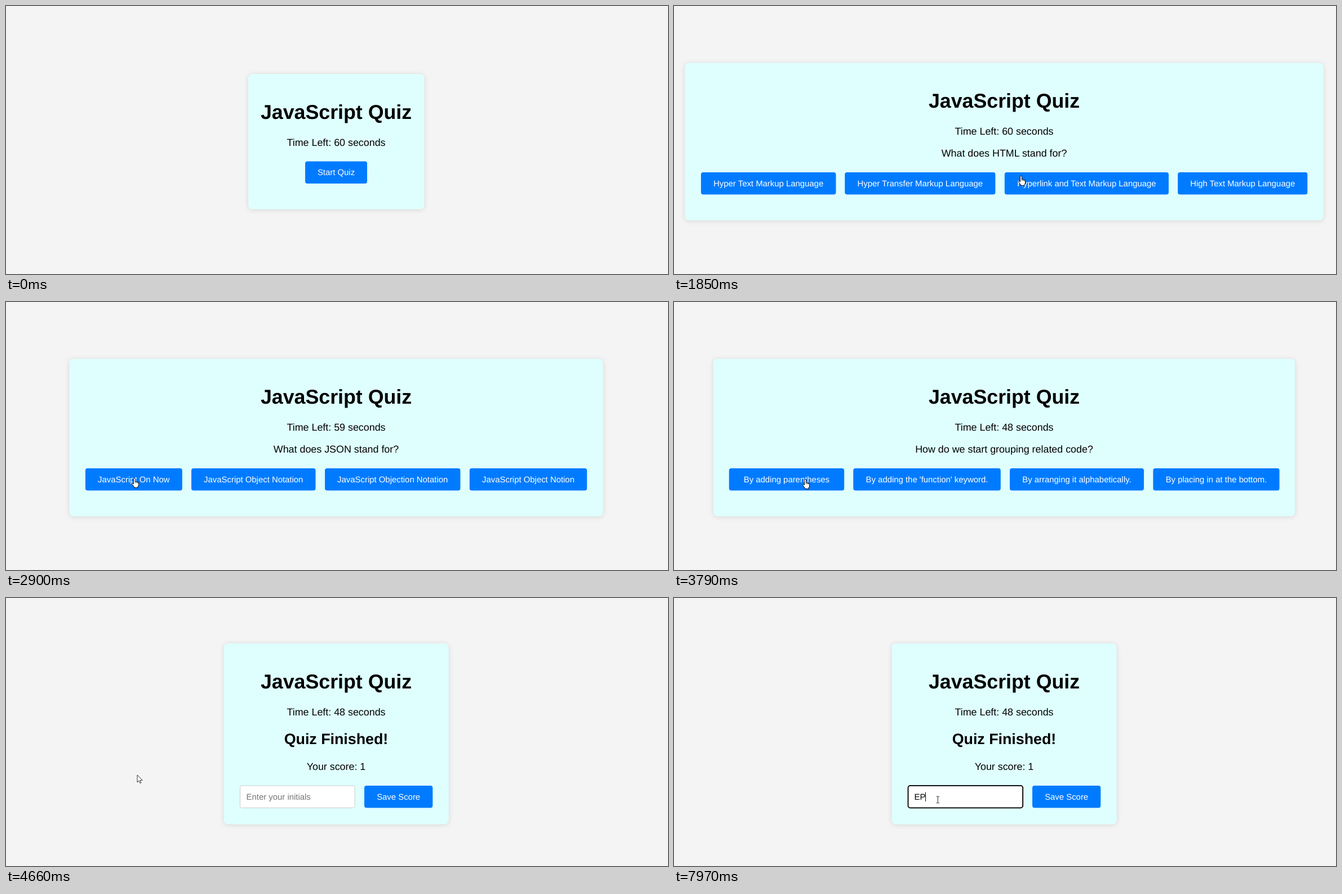
An HTML page that plays this animation: 1175x477 px, repeating every 8 s.

```html
<!DOCTYPE html>
<html lang="en">
<head>
<meta charset="utf-8">
<title>JavaScript Quiz</title>
<style>
  html, body { margin: 0; width: 100%; height: 100%; overflow: hidden; background: #f4f4f4; }
  svg { display: block; width: 100vw; height: 100vh; }
  text { font-family: "Liberation Sans", Arial, sans-serif; font-size: 17.87px; text-rendering: geometricPrecision; white-space: pre; }
  .mid { text-anchor: middle; }
  .h1 { font-size: 35.75px; font-weight: bold; }
  .h2 { font-size: 26.8px; font-weight: bold; }
  .label { font-size: 14.9px; fill: #fff; }
  .field { font-size: 14.9px; }
  .card { fill: #dfffff; filter: drop-shadow(0 1.9px 4.2px rgba(0, 0, 0, .12)); }
  .cursor { fill: #fff; stroke: #000; stroke-width: 1; stroke-linejoin: round; }
</style>
</head>
<body>
<svg id="stage" viewBox="0 0 1175 477"></svg>
<script>
const LOOP = 8000, MID = 586;
const stage = document.getElementById('stage');

// Buttons are [x, width, label].
const screens = {
  start: { x: 430, w: 312.4, y: 121, h: 241, by: 276.5, buttons: [[531, 110, 'Start Quiz']] },
  html: { x: 19.3, w: 1133.4, y: 101.3, h: 280.2, by: 295.9, ask: 'What does HTML stand for?', buttons: [
    [47.9, 239.5, 'Hyper Text Markup Language'], [303.2, 267.2, 'Hyper Transfer Markup Language'],
    [586.8, 291.2, 'Hyperlink and Text Markup Language'], [894.2, 230.1, 'High Text Markup Language']] },
  json: { x: 112.4, w: 947.2, y: 101.3, h: 280.2, by: 295.9, ask: 'What does JSON stand for?', buttons: [
    [140.9, 171.9, 'JavaScript On Now'], [329, 220.5, 'JavaScript Object Notation'],
    [566, 240.4, 'JavaScript Objection Notation'], [822.8, 208.4, 'JavaScript Object Notion']] },
  group: { x: 69.8, w: 1032.4, y: 101.3, h: 280.2, by: 295.9, ask: 'How do we start grouping related code?', buttons: [
    [97.7, 204.4, 'By adding parentheses'], [318.2, 261.6, "By adding the 'function' keyword."],
    [596, 238, 'By arranging it alphabetically.'], [850.4, 224.2, 'By placing in at the bottom.']] },
  done: { x: 386.5, w: 399.2, y: 80.7, h: 322, by: 334, buttons: [[636, 121.3, 'Save Score']] }
};
const field = { x: 415, y: 333.5, w: 204.6, h: 40.5 };

const shapes = {
  arrow: '<path transform="scale(.8)" d="M0 0V16.2L3.7 12.7 6.2 18.3 8.6 17.2 6.2 11.7H11.4Z"/>',
  hand: '<path d="M-1.6 1.7Q-1.6 .4 -.1 .4T1.4 1.7V6.6Q3.3 5.8 3.8 7.2 5.3 6.5 5.9 8 7.5 7.6 7.5 9.3V12.3Q7.4 14.6 5.8 15.8V17.6H-.4V16.2Q-1.4 14.8 -4 11.8-5.2 9.7-3.6 9.3-2.5 9.3-1.6 10.9Z"/>' +
    '<path stroke-width=".7" d="M1.4 6.6V9.4M3.8 7.2V9.6M5.9 8V9.8"/>',
  beam: '<path fill="none" stroke="#222" d="M-1.4-5.5Q.8-5.5 1.3-4.6 1.8-5.5 4-5.5M1.3-4.6V5.6M-1.4 6.5Q.8 6.5 1.3 5.6 1.8 6.5 4 6.5"/>'
};

const mix = (a, b, p) => a + (b - a) * p;
const clamp = p => Math.max(0, Math.min(1, p));
const ease = p => p * p * (3 - 2 * p);
const line = (a, b, p) => [mix(a[0], b[0], p), mix(a[1], b[1], p)];
const curve = (a, c, b, p) => line(line(a, c, p), line(c, b, p), p);
// Progress from 0 to 1 in n held positions, the last reached at time b.
const held = (t, a, b, n) => clamp(Math.floor((t - a) / (b - a) * (n - 1) + 1e-6) / (n - 1));
const between = (t, a, b) => t >= a && t < b;
const inside = ([px, py], x, y, w, h) => px >= x && px <= x + w && py >= y && py <= y + h;

const rect = (x, y, w, h, r, attrs) => `<rect x="${x}" y="${y}" width="${w}" height="${h}" rx="${r}" ${attrs}/>`;
const text = (x, y, s, cls = 'mid', attrs = '') => `<text x="${x}" y="${y}" class="${cls}" ${attrs}>${s}</text>`;

function screenAt(t) {
  if (t < 1850) return 'start';
  if (t < 2900) return 'html';
  if (t < 3790) return 'json';
  return t < 4660 ? 'group' : 'done';
}

function pointer(t) {
  const start = [616, 302], tap = [233, 315], save = [726, 357], entry = [467, 358.5];
  if (t < 740) return null;
  if (t < 1970) return curve([1104, 468], [770, 430], start, ease(held(t, 740, 1490, 12)));
  if (t < 2560) return line(start, [239, 310], ease(held(t, 1904, 2500, 10)));
  if (t < 3240) return [228, 313];
  if (t < 3310) return [230.5, 314];
  if (t < 5600) return tap;
  const p = held(t, 5532, 6212, 11);
  return p < .6 ? line(tap, save, ease(p / .6)) : line(save, entry, ease((p - .6) / .4));
}

function cursor(t, name) {
  const at = pointer(t);
  if (!at) return '';
  const { by, buttons } = screens[name];
  let kind = 'arrow';
  if (buttons.some(([x, w]) => inside(at, x, by, w, 39.5))) kind = 'hand';
  if (name === 'done' && inside(at, field.x, field.y, field.w, field.h)) kind = 'beam';
  if (between(t, 4590, 4660)) kind = 'arrow';
  const clicked = between(t, 1730, 1780) ||
    [2760, 3650, 4520, 6280].some(c => between(t, c, c + 140));
  const spot = clicked ? `<circle cx="${at[0] - .7}" cy="${at[1] + .5}" r="9" fill="#ff0" opacity=".55"/>` : '';
  return `${spot}<g class="cursor" transform="translate(${at})">${shapes[kind]}</g>`;
}

function entryField(t) {
  const focus = t >= 6350, { x, y, w, h } = field;
  const typed = t >= 7970 ? 'EP' : t >= 7550 ? 'E' : '';
  const border = focus ? 'stroke="#101010" stroke-width="2"' : 'stroke="#ccc"';
  const caretX = 427.5 + typed.length * 9.6;
  const caret = focus && !between(t, 6890, 7420)
    ? rect(Math.floor(caretX), 345.5, 1, 16.5, 0, 'fill="#000"') : '';
  return rect(x + .5, y + .5, w - 1, h - 1, 3.7, `fill="#fff" ${border}`) +
    text(426.6, 358.8, typed || 'Enter your initials', 'field', typed ? '' : 'fill="#757575"') + caret;
}

function render(t) {
  const name = screenAt(t), s = screens[name];
  const left = t < 2830 ? 60 : t < 3790 ? 59 : 48;
  let out = rect(s.x, s.y, s.w, s.h, 7.5, 'class="card"') +
    text(MID, s.y + 79.8, 'JavaScript Quiz', 'mid h1') +
    text(MID, s.y + 128, `Time Left: ${left} seconds`);
  if (s.ask) out += text(MID, 268.3, s.ask);
  if (name === 'done') {
    out += text(MID, 260, 'Quiz Finished!', 'mid h2') + text(MID, 305.6, 'Your score: 1') + entryField(t);
  }
  for (const [x, w, label] of s.buttons) {
    out += rect(x, s.by, w, 39.5, 3.9, 'fill="#007bff"') + text(x + w / 2, s.by + 24.8, label, 'mid label');
  }
  return out + cursor(t, name);
}

let shown = '';
function tick(now) {
  const next = render(now % LOOP);
  if (next !== shown) stage.innerHTML = shown = next;
  requestAnimationFrame(tick);
}
tick(performance.now());
</script>
</body>
</html>
```
